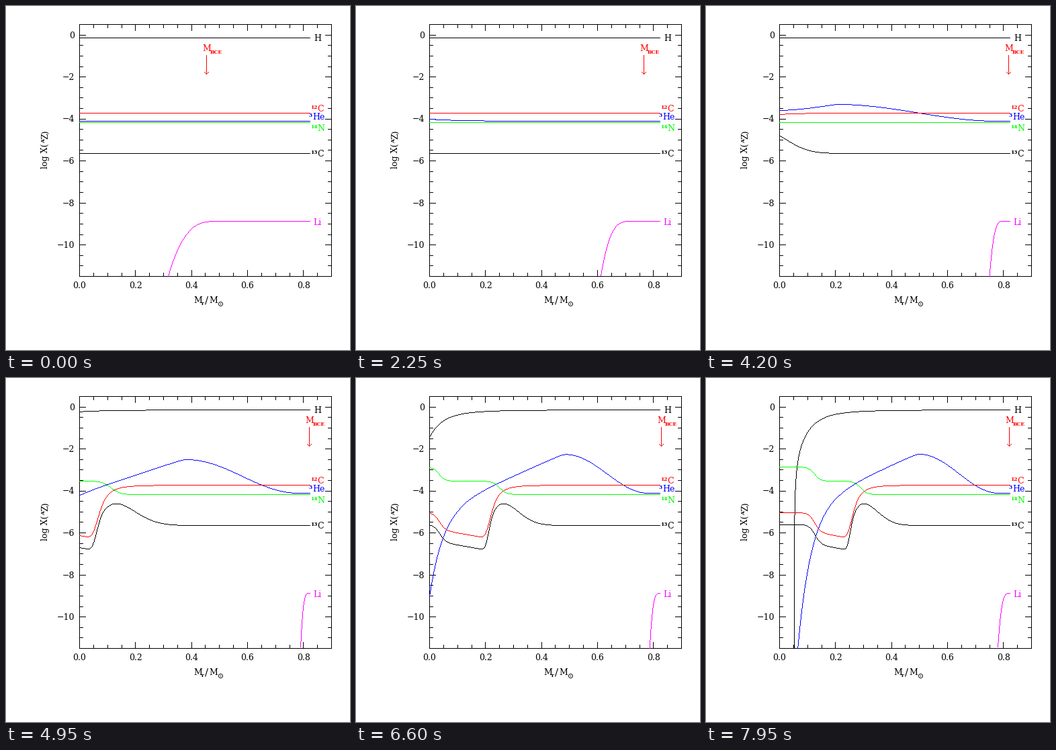
A matplotlib script that plays this animation: 512x512 px, repeating every 8 s.

```python
import numpy as np
import matplotlib.pyplot as plt
from matplotlib.animation import FuncAnimation

SIZE, DPI = 512, 100
PX = 72 / DPI
LEFT, RIGHT, TOP, BOTTOM = 109, 484, 27, 402
X_END = 452
BLACK, RED, GREEN = (0, 0, 0), (255, 0, 0), (0, 255, 0)
BLUE, MAGENTA = (0, 0, 255), (255, 0, 255)
GRID = np.arange(LEFT, X_END + 0.05, 0.1)

plt.rcParams["font.family"] = "DejaVu Serif"
fig = plt.figure(figsize=(SIZE / DPI, SIZE / DPI), dpi=DPI, facecolor="white")
ax = fig.add_axes([0, 0, 1, 1])
ax.set(xlim=(0, SIZE), ylim=(SIZE, 0))
ax.axis("off")


def smooth(t, keys):
    """Monotone cubic through the key points, constant outside them."""
    xs, ys = (np.array(list(v), float) for v in (keys.keys(), keys.values()))
    h = np.diff(xs)
    s = np.diff(ys) / h
    turn = s[:-1] * s[1:] <= 0
    mid = 2 * s[:-1] * s[1:] / np.where(turn, 1, s[:-1] + s[1:])
    m = np.r_[s[0], np.where(turn, 0, mid), s[-1]]
    t = np.clip(t, xs[0], xs[-1])
    i = min(np.searchsorted(xs, t, "right") - 1, len(h) - 1)
    u = (t - xs[i]) / h[i]
    return ((1 + 2 * u) * (1 - u) ** 2 * ys[i] + u * (1 - u) ** 2 * h[i] * m[i]
            + u * u * (3 - 2 * u) * ys[i + 1] + u * u * (u - 1) * h[i] * m[i + 1])


def sigmoid(v):
    return 1 / (1 + np.exp(-np.clip(v, -60, 60)))


def stroke(img, xs, ys, color=BLACK):
    """Paint a one-pixel line without antialiasing, inside the plot box."""
    xs, ys = np.asarray(xs, float), np.asarray(ys, float)
    steps = np.maximum(abs(np.diff(xs)), abs(np.diff(ys)))
    length = np.r_[0, np.cumsum(steps)]
    at = np.r_[np.arange(0, length[-1], 1), length[-1]]
    px = np.rint(np.interp(at, length, xs)).astype(int)
    py = np.rint(np.interp(at, length, ys)).astype(int)
    ok = (px >= LEFT) & (px <= RIGHT) & (py >= TOP) & (py <= BOTTOM)
    img[py[ok], px[ok]] = color


def text(x, y, s, color=BLACK, size=12.5, **kw):
    return ax.text(x, y, s, color=np.array(color) / 255, fontsize=size * PX,
                   va="baseline", **kw)


def small(x, y, s, color=BLACK, **kw):
    return text(x, y, s, color, 7.5, weight="bold", **kw)


def draw_axes(img):
    stroke(img, [LEFT, RIGHT, RIGHT, LEFT, LEFT], [TOP, TOP, BOTTOM, BOTTOM, TOP])
    for k in range(1, 18):
        x, n = LEFT + k * 375 / 18, 9 if k % 4 == 0 else 5
        stroke(img, [x, x], [BOTTOM, BOTTOM - n])
        stroke(img, [x, x], [TOP, TOP + n])
    for k in range(1, 24):
        y, n = TOP + k * 375 / 24, 9 if k % 4 == 1 else 5
        stroke(img, [LEFT, LEFT + n], [y, y])
        stroke(img, [RIGHT, RIGHT - n], [y, y])


def draw_labels():
    for k in range(5):
        text(LEFT + 0.5 + k * 83.33, 419.5, f"{0.2 * k:.1f}", ha="center")
    for k in range(6):
        text(102, 47.5 + k * 62.5, f"\u2212{2 * k}" if k else "0", ha="right")

    text(279.5, 442, "M")
    small(291, 445, "r")
    text(296.5, 443, "/", size=15)
    text(302.5, 442, "M")
    ax.plot(318.5, 442.5, "o", ms=6 * PX, mfc="none", mec="black", mew=0.9 * PX)
    ax.plot(318.5, 442.5, "o", ms=1.6 * PX, color="black", mew=0)

    up = dict(rotation=90, rotation_mode="anchor")
    text(62, 242, "log X(", **up)
    small(58, 204, "A", **up)
    text(62, 198, "Z)", **up)

    text(458, 52, "H")
    text(457.5, 326, "Li", MAGENTA)
    for x, y, mass, name, color in [(453.5, 157, "12", "C", RED),
                                    (451, 169, "3", "He", BLUE),
                                    (453.5, 186, "14", "N", GREEN),
                                    (453.5, 224, "13", "C", BLACK)]:
        small(x, y - 4, mass, color)
        text(x + 5 * len(mass), y, name, color)


# motion of the main features, in pixels over steps
ARROW = {0: 298, 7: 388, 15: 428, 23: 447, 33: 451, 48: 454, 53: 451}
LI_FOOT = {0: 241, 15: 364, 23: 395, 33: 438, 48: 436, 53: 434}
LI_WIDTH = {0: 77, 15: 45, 23: 33, 33: 12, 53: 17}
CORE_EDGE = {0: -300, 23: -200, 33: 18, 40: 71, 48: 112, 53: 131}
CN_FRONT = {0: -60, 23: -8, 33: 126, 40: 167, 48: 205, 53: 208}
HE_PEAK = {23: 109, 33: 268, 40: 302, 48: 317, 53: 317}
HE_TOP = {23: 140, 33: 121, 40: 114, 48: 113}


def hydrogen(edge):
    x = GRID[GRID > edge + 0.05]
    y = 47 + 31.25 * np.log10(1 + (51 / (x - edge)) ** 2.5)
    if edge > LEFT:
        x, y = np.r_[edge, x], np.r_[BOTTOM, y]
    return x, y


def cycle_curves(front, edge):
    """Heights of carbon-12, carbon-13 and nitrogen-14."""
    stretch = 1 - 0.0034 * max(front - 126, 0)
    d = (GRID - front) / stretch
    rise = np.maximum(d + 6, 0)
    tilt = 0.175 * np.clip(front - 6 - GRID, 0, None)
    burnt = sigmoid((edge + 30 - GRID) / 4.5)

    d12 = np.maximum((GRID - front) / np.sqrt(stretch) + 6, 0)
    c12 = 159 + 77 / (1 + (d12 / 19.7) ** 3.1) - tilt
    outer = 219 - 36 * np.exp(-(np.maximum(d - 30, 0) / 48) ** 2)
    c13 = outer + (254 - outer) / (1 + (rise / 17.3) ** 3.5) - tilt
    n14 = 153 + 20 * sigmoid((d - 30) / 6.5)
    return [y + (core - y) * burnt
            for y, core in ((c12, 200), (c13, 217.5), (n14, 132))]


def helium(step, edge):
    early = 171 - 11 * (step / 23) ** 3 * np.exp(-(GRID - LEFT) / 45)

    peak, top = smooth(step, HE_PEAK), smooth(step, HE_TOP)
    slope = 0.33 + 0.0026 * max(peak - 268, 0)
    inner = (top + slope * (np.hypot(peak - GRID, 6) - 6)
             + 300 * np.exp((edge - 2 - GRID) / 20))
    u = np.clip((GRID - peak) / (435 - peak), 0, 1)
    outer = top + (171 - top) * np.sin(np.pi / 2 * u) ** 2
    late = np.where(GRID < peak, inner, outer)

    w = np.clip((step - 23) / 9, 0, 1)
    w = w * w * (3 - 2 * w)
    return np.minimum((1 - w) * early + w * late, BOTTOM + 20)


def lithium(step):
    foot, width = smooth(step, LI_FOOT), smooth(step, LI_WIDTH)
    x = GRID[GRID >= foot]
    return x, 320 + 82 * (1 - np.clip((x - foot) / width, 0, 1)) ** 3.3


base = np.full((SIZE, SIZE, 3), 255, np.uint8)
draw_axes(base)
draw_labels()
canvas = fig.figimage(base, origin="upper", zorder=-1)
m_text = text(0, 67, "M", RED)
bce_text = small(0, 71, "BCE", RED)


def update(frame):
    step = frame // 3
    img = base.copy()
    edge = smooth(step, CORE_EDGE)
    c12, c13, n14 = cycle_curves(smooth(step, CN_FRONT), edge)

    stroke(img, *hydrogen(edge))
    stroke(img, GRID, helium(step, edge), BLUE)
    stroke(img, GRID, c12, RED)
    stroke(img, GRID, c13)
    stroke(img, GRID, n14, GREEN)
    stroke(img, *lithium(step), MAGENTA)

    x = int(round(smooth(step, ARROW)))
    stroke(img, [x, x], [73, 101], RED)
    stroke(img, [x - 3, x, x + 3], [98, 101, 98], RED)
    m_text.set_x(x - 5.5)
    bce_text.set_x(x + 5.5)
    canvas.set_data(img)
    return canvas, m_text, bce_text


anim = FuncAnimation(fig, update, frames=160, interval=50, repeat=True,
                     repeat_delay=0, blit=False)
plt.show()
```
